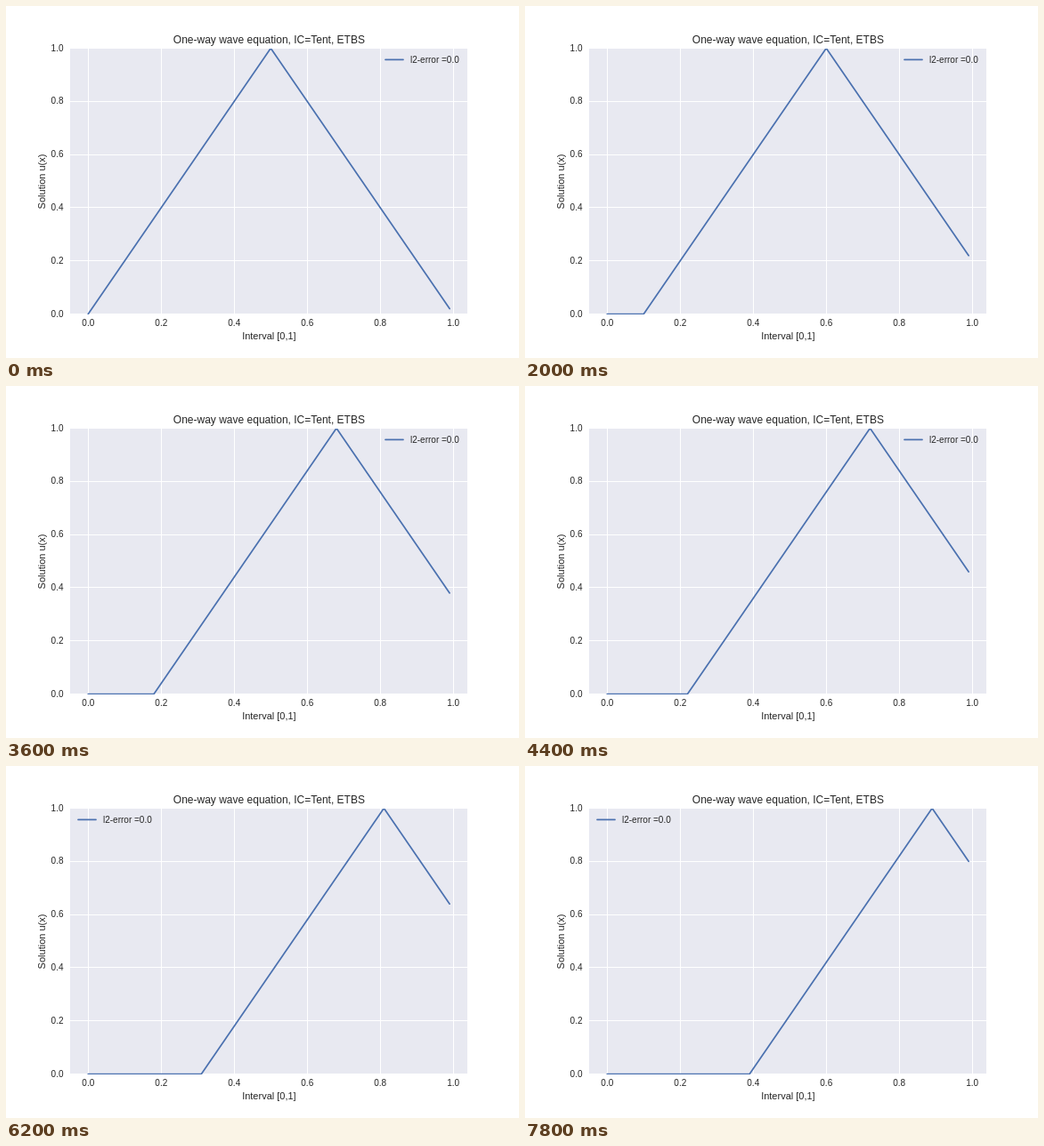
An HTML page with a canvas that plays this animation: 576 by 396 pixels, repeating every 8 s.

```html
<!DOCTYPE html>
<html lang="en">
<head>
<meta charset="utf-8">
<title>One-way wave equation</title>
<style>
html, body { margin: 0; width: 100%; height: 100%; overflow: hidden; background: #fff; }
canvas { display: block; }
</style>
</head>
<body>
<canvas id="plot" width="576" height="396"></canvas>
<script>
const ctx = document.getElementById('plot').getContext('2d');
const LOOP = 8000, STEP = 200, SHIFT = 0.01, LAST_X = 0.99;
const LEGEND_MOVE = 0.765;
const BLUE = '#4c72b0', INK = '#262626', PANEL = '#e8e9f1';
const area = { left: 72, top: 48, right: 518, bottom: 347 };
const px = x => 92.29 + x * 409.92;
const py = y => 346.5 - y * 298.98;

function text(str, x, y, size, align = 'center') {
  ctx.font = `${size}px "Liberation Sans", Arial, sans-serif`;
  ctx.textAlign = align;
  ctx.fillStyle = INK;
  ctx.fillText(str, x, y);
}

function stroke(points) {
  ctx.beginPath();
  points.forEach(([x, y]) => ctx.lineTo(x, y));
  ctx.strokeStyle = BLUE;
  ctx.lineWidth = 1.75;
  ctx.lineJoin = ctx.lineCap = 'round';
  ctx.stroke();
}

function drawAxes() {
  const { left, top, right, bottom } = area;
  ctx.fillStyle = '#fff';
  ctx.fillRect(0, 0, 576, 396);
  ctx.fillStyle = PANEL;
  ctx.fillRect(left, top, right - left, bottom - top);
  for (let i = 0; i <= 5; i++) {
    const v = i / 5, label = v.toFixed(1);
    ctx.fillStyle = '#fff';
    ctx.fillRect(Math.floor(px(v)), top, 1, bottom - top);
    ctx.fillRect(left, Math.ceil(py(v)) - 1, right - left, 1);
    text(label, px(v), 360, 10);
    text(label, 64.5, Math.round(py(v)) + 3, 10, 'right');
  }
  text('One-way wave equation, IC=Tent, ETBS', 295.4, 42, 12);
  text('Interval [0,1]', 295.4, 375, 11);
  ctx.save();
  ctx.translate(44, 197.5);
  ctx.rotate(-Math.PI / 2);
  text('Solution u(x)', 0, 0, 11);
  ctx.restore();
}

function drawTent(shift) {
  const { left, top, right, bottom } = area;
  const peak = shift + 0.5;
  const tent = [[0, 0], [shift, 0], [peak, 1], [LAST_X, 1 - 2 * (LAST_X - peak)]];
  ctx.save();
  ctx.beginPath();
  ctx.rect(left, top, right - left, bottom - top);
  ctx.clip();
  stroke(tent.map(([x, y]) => [px(x), py(y)]));
  ctx.restore();
}

// The legend jumps left once the falling edge would cross it.
function drawLegend(shift) {
  const x = shift + 0.5 > LEGEND_MOVE ? 81 : 426;
  stroke([[x, 60.3], [x + 20, 60.3]]);
  text('l2-error =0.0', x + 28, 64, 10, 'left');
}

function draw(time) {
  const shift = Math.floor((time % LOOP) / STEP) * SHIFT;
  drawAxes();
  drawTent(shift);
  drawLegend(shift);
}

let start;
function tick(now) {
  start ??= now;
  draw(Math.max(0, now - start));
  requestAnimationFrame(tick);
}
draw(0);
requestAnimationFrame(tick);
</script>
</body>
</html>
```
